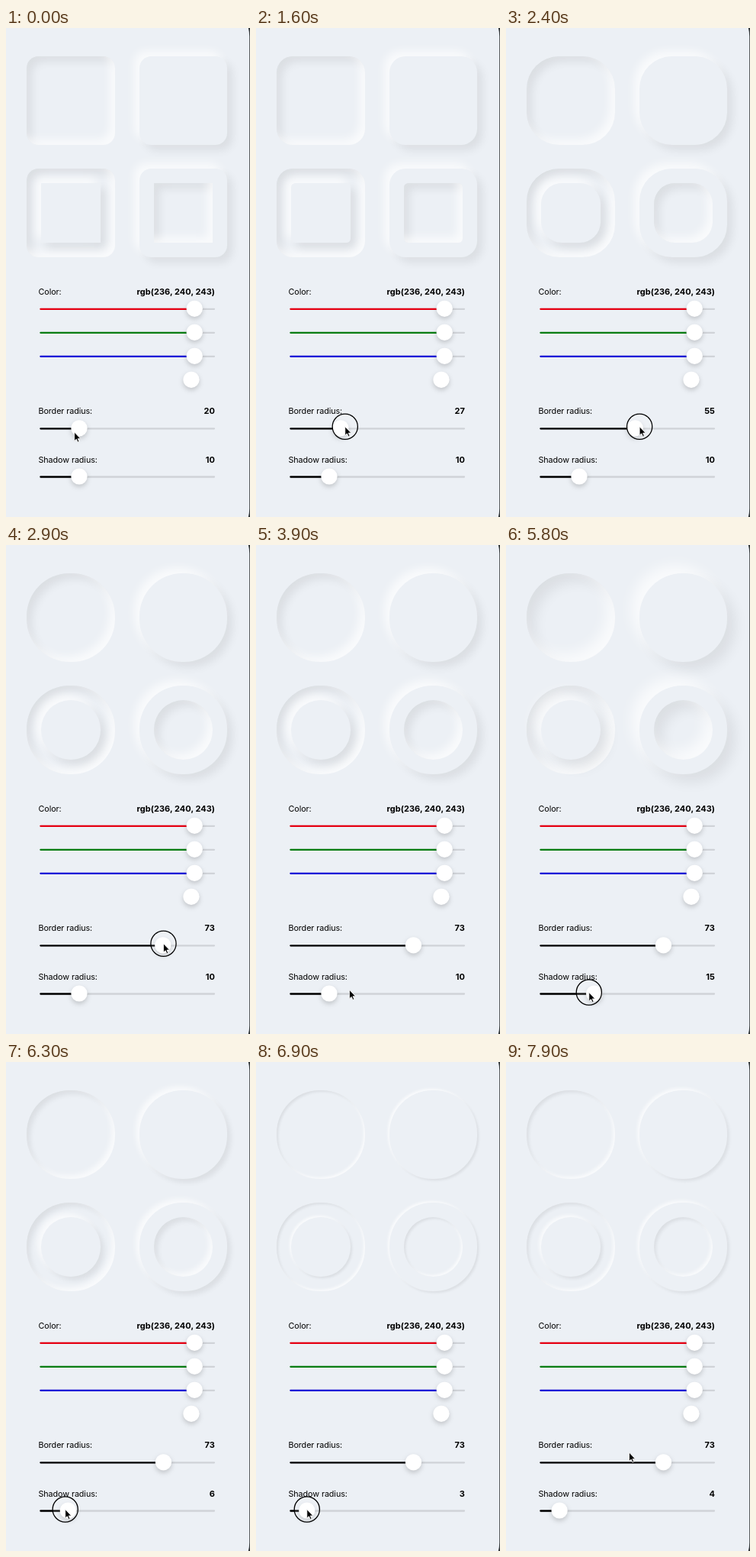
Animation, 320 px wide and 640 px high, one loop 8000 ms. Source, as an HTML page:

```html
<!DOCTYPE html>
<html lang="en">
<head>
<meta charset="utf-8">
<title>Soft shadows</title>
<style>
html, body { margin: 0; width: 100%; height: 100%; overflow: hidden; background: #ecf0f5; }
#stage { position: relative; width: 320px; height: 640px; overflow: hidden; background: #ecf0f5; }
.tile { position: absolute; background: #ecf0f5; }
svg { position: absolute; left: 0; top: 0; }
text { font: 10.8px Inter, "Open Sans", sans-serif; fill: #000; letter-spacing: -.1px; }
.value { font-size: 11px; font-weight: 700; text-anchor: end; letter-spacing: .04px; }
.knob { fill: #fff; filter: drop-shadow(0 3px 3px rgba(0, 0, 0, .18)); }
</style>
</head>
<body>
<div id="stage">
  <svg id="ui" width="320" height="640" viewBox="0 0 320 640"></svg>
</div>
<script>
const LOOP = 8000, STEP = 100, PT = 320 / 414;
const LAG = 80; // the knob trails the pointer by this many ms
const MAX_RADIUS = 100, MAX_SHADOW = 50;
const stage = document.getElementById('stage');
const ui = document.getElementById('ui');

const ramp = (t, from, to) => Math.min(1, Math.max(0, (t - from) / (to - from)));
const mix = (a, b, u) => a + (b - a) * u;
const easeIn = u => u * u;
const easeOut = u => 1 - (1 - u) * (1 - u);
const smooth = u => u * u * (3 - 2 * u);

function add(tag, attrs, text) {
  const el = document.createElementNS('http://www.w3.org/2000/svg', tag);
  for (const k in attrs) el.setAttribute(k, attrs[k]);
  if (text) el.textContent = text;
  ui.appendChild(el);
  return el;
}

// Tiles: outer ones are 150pt, nested ones 100pt
function tile(x, y, pt, raised) {
  const el = document.createElement('div');
  const size = pt * PT;
  el.className = 'tile';
  el.style.cssText = `left:${x}px;top:${y}px;width:${size}px;height:${size}px`;
  stage.insertBefore(el, ui);
  return { el, raised, size, nested: pt < 150 };
}
const LEFT = 27, RIGHT = 174.5, TOP = 36.9, LOW = 183.9, PAD = 25 * PT;
const tiles = [
  tile(LEFT, TOP, 150, false),
  tile(RIGHT, TOP, 150, true),
  tile(LEFT, LOW, 150, false),
  tile(LEFT + PAD, LOW + PAD, 100, true),
  tile(RIGHT, LOW, 150, true),
  tile(RIGHT + PAD, LOW + PAD, 100, false)
];

function drawTiles(radius, shadow) {
  const d = shadow * PT * .9, blur = shadow * PT * 1.45;
  for (const t of tiles) {
    const r = Math.max(0, radius - (t.nested ? 20 : 0)) * PT;
    const inset = t.raised ? '' : 'inset ';
    t.el.style.borderRadius = Math.min(r, t.size / 2) + 'px';
    t.el.style.boxShadow =
      `${inset}${-d}px ${-d}px ${blur}px rgba(255,255,255,.7),` +
      `${inset}${d}px ${d}px ${blur}px rgba(0,0,0,.075)`;
  }
}

// Sliders
const knobX = (v, max) => 54.3 + 208.5 * v / max;

function slider(y, color, max) {
  const line = { y1: y + .5, y2: y + .5, 'stroke-width': 2.3, 'stroke-linecap': 'round' };
  add('line', { ...line, x1: 45.4, x2: 273, stroke: '#d0d3d8' });
  const bar = add('line', { ...line, x1: 45.4, x2: 45.4, stroke: color });
  const knob = add('circle', { class: 'knob', cy: y, r: 10.6 });
  return v => {
    const x = knobX(v, max);
    bar.setAttribute('x2', x);
    knob.setAttribute('cx', x);
  };
}
function label(y, name, value) {
  add('text', { x: 42.5, y }, name);
  return add('text', { x: 274, y, class: 'value' }, value);
}

label(349.1, 'Color:', 'rgb(236, 240, 243)');
['#e60012', '#0a7d12', '#1208d8'].forEach((color, i) =>
  slider(367.3 + 31 * i, color, 255)(236));
add('circle', { class: 'knob', cx: 243, cy: 460.3, r: 10.6 });

const radiusText = label(505.3, 'Border radius:');
const setRadius = slider(523.8, '#000', MAX_RADIUS);
const shadowText = label(568.8, 'Shadow radius:');
const setShadow = slider(587, '#000', MAX_SHADOW);

add('path', {
  d: 'M317.8 0Q319.2 5 319.2 11V629Q319.2 635 317.8 640H320V0Z', fill: '#33383a'
});
const ring = add('circle', {
  r: 16.6, fill: '#fff', 'fill-opacity': .12, stroke: '#000', 'stroke-width': 1.3
});
const pointer = add('path', {
  d: 'M0 0V11.4L2.6 9.1L4.4 13L6.2 12.2L4.5 8.4H8Z',
  fill: '#000', stroke: '#fff', 'stroke-width': .8, 'stroke-linejoin': 'round'
});

// Motion
const radiusAt = t => mix(20, 73, ramp(t, 1395, 2910));

function shadowAt(t) {
  if (t < 5230) return mix(10, 30, smooth(ramp(t, 4200, 5100)));
  return mix(30, 3, easeOut(ramp(t, 5230, 6900))) + .8 * ramp(t, 7000, 7600);
}

function pointerAt(t) {
  const rx = knobX(radiusAt(t + LAG), MAX_RADIUS);
  const sx = knobX(shadowAt(t + LAG), MAX_SHADOW);
  if (t < 1200) {
    const u = ramp(t, 0, 600);
    return [mix(89.7, rx, u), mix(529, 522, u)];
  }
  if (t < 3300) return [rx, 521.7];
  if (t < 4200) {
    const u = ramp(t, 3300, 4090);
    return [mix(rx, sx, u), mix(521.7, 586, easeOut(u))];
  }
  const u = easeIn(ramp(t, 7700, 7900));
  return [mix(sx, 161.5, u), mix(585.5, 511, u)];
}

const pressed = t => (t >= 1100 && t < 3000) || (t >= 4200 && t < 7700);

function draw(t) {
  const radius = radiusAt(t), shadow = shadowAt(t);
  drawTiles(radius, shadow);
  setRadius(radius);
  setShadow(shadow);
  radiusText.textContent = Math.round(radius);
  shadowText.textContent = Math.round(shadow);
  const place = `translate(${pointerAt(t)})`;
  pointer.setAttribute('transform', place);
  ring.setAttribute('transform', place);
  ring.setAttribute('visibility', pressed(t) ? 'visible' : 'hidden');
}

const start = performance.now();
function tick(now) {
  const t = Math.max(0, now - start) % LOOP;
  draw(Math.floor(t / STEP) * STEP);
  requestAnimationFrame(tick);
}
draw(0);
requestAnimationFrame(tick);
</script>
</body>
</html>
```
